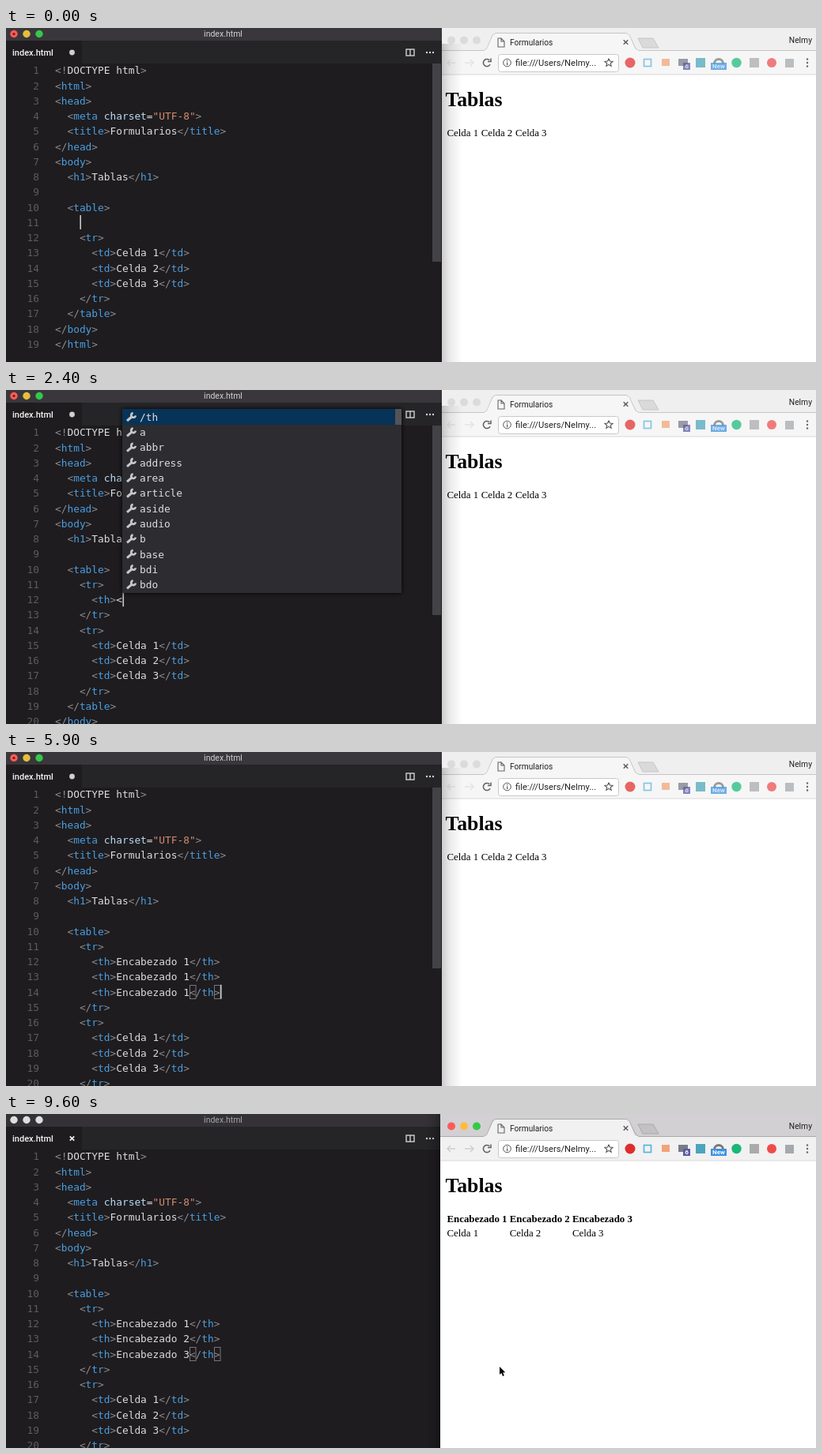
Write an HTML page with a canvas that moves like this. It is 1024 by 423 pixels and loops after 9700 ms.

```html
<!DOCTYPE html>
<html lang="es">
<head>
<meta charset="UTF-8">
<title>Tablas</title>
<style>
html, body { margin: 0; height: 100%; overflow: hidden; background: #fff; }
canvas { display: block; }
</style>
</head>
<body>
<canvas id="stage" width="1024" height="423"></canvas>
<script>
const g = document.getElementById('stage').getContext('2d');
const LOOP = 9700, SAVE = 7100, FOCUS = 8500, RELOAD = 8650;
const LEFT = 62, CW = 7.722, ROW = 19.25, FIRST = 11;
const MONO = '12.83px "DejaVu Sans Mono", monospace';
const UI = 'Roboto, sans-serif', SERIF = '"Liberation Serif", serif';
const WHITE = '#dcdcdc', BLUE = '#4a9ee0', GREY = '#8c8c90';
const USER = 'Nelmy';

const head = ['<!DOCTYPE html>', '<html>', '<head>', '  <meta charset="UTF-8">',
  '  <title>Formularios</title>', '</head>', '<body>', '  <h1>Tablas</h1>', '', '  <table>'];
const tail = ['    <tr>', ...[1, 2, 3].map(n => `      <td>Celda ${n}</td>`),
  '    </tr>', '  </table>', '</body>', '</html>'];
const tags = ('a abbr address area article aside audio b base bdi bdo blockquote table tbody td ' +
  'template textarea tfoot th thead time title tr track').split(' ');

// Typing script: "|" marks the caret, close is the tag the popup offers to end
const steps = [];
const step = (at, text, close) => steps.push({ at, text, close });
const inRow = s => `    <tr>\n      ${s}\n    </tr>`;
const cells = (...list) => inRow(list.map(s => `<th>Encabezado ${s}`).join('\n      '));

step(0, '    |');
step(150, '    <|', 'table');
step(300, '    <t|', 'table');
step(400, '    <tr|', 'table');
step(550, '    <tr>|');
step(700, '    <tr><|', 'tr');
step(900, '    <tr></tr>|');
step(1100, '    <tr>|</tr>');
step(1350, inRow('|'));
step(1700, inRow('<|'), 'tr');
step(1850, inRow('<t|'), 'tr');
step(2050, inRow('<th|'), 'tr');
step(2200, inRow('<th>|'));
step(2400, inRow('<th><|'), 'th');
step(2600, inRow('<th></th>|'));
for (let i = 4; i >= 0; i--)
  step(3050 - i * 60, inRow('<th>' + '</th>'.slice(0, i) + '|' + '</th>'.slice(i)));
for (let i = 1; i <= 12; i++)
  step(3250 + i * 100, inRow('<th>' + 'Encabezado 1'.slice(0, i) + '|</th>'));
step(4750, cells('1</th>|'));
step(5200, cells('1</th>', '1</th>|'));
step(5700, cells('1</th>', '1</th>', '1</th>|'));
step(6050, cells('1</th>', '1</th>|', '1</th>'));
step(6200, cells('1</th>', '1|</th>', '1</th>'));
step(6400, cells('1</th>', '|</th>', '1</th>'));
step(6500, cells('1</th>', '2|</th>', '1</th>'));
step(6650, cells('1</th>', '2</th>', '1|</th>'));
step(6750, cells('1</th>', '2</th>', '|</th>'));
step(6850, cells('1</th>', '2</th>', '3|</th>'));

const path = [[7250, 300, 300], [7700, 331, 271], [7900, 331, 271],
  [8450, 608, 46], [8800, 608, 46], [9350, 624, 320]];

const midY = line => 53.5 + (line - 1) * ROW;
const colX = col => LEFT + col * CW;

function box(x, y, w, h, color) {
  g.fillStyle = color;
  g.fillRect(x, y, w, h);
}
function dot(x, y, r, color) {
  g.fillStyle = color;
  g.beginPath();
  g.arc(x, y, r, 0, 7);
  g.fill();
}
function line(color, width, ...pts) {
  g.strokeStyle = color;
  g.lineWidth = width;
  g.beginPath();
  for (let i = 0; i < pts.length; i += 2) g.lineTo(pts[i], pts[i + 1]);
  g.stroke();
}
function frame(x, y, w, h, color, width = 1) {
  g.strokeStyle = color;
  g.lineWidth = width;
  g.strokeRect(x, y, w, h);
}
function text(s, x, y, font, color, align = 'left') {
  g.font = font;
  g.fillStyle = color;
  g.textAlign = align;
  g.fillText(s, x, y);
}
function cross(x, y, r, color, w) {
  line(color, w, x - r, y - r, x + r, y + r);
  line(color, w, x + r, y - r, x - r, y + r);
}
// Shadow of the front window, fading from x over w pixels
function shade(x, w, y, alpha) {
  const fade = g.createLinearGradient(x, 0, x + w, 0);
  fade.addColorStop(0, `rgba(0,0,0,${alpha})`);
  fade.addColorStop(.4, `rgba(0,0,0,${alpha * .4})`);
  fade.addColorStop(1, 'rgba(0,0,0,0)');
  box(Math.min(x, x + w), y, Math.abs(w), 423 - y, fade);
}

function codeLine(s, y, broken) {
  for (const m of s.matchAll(/<!?\/?|>|(?<=<\/?)\w+|"[^"]*"|\w+|./g)) {
    const tok = m[0], before = s[m.index - 1];
    let color = WHITE;
    if (/^[<>]/.test(tok)) color = tok === '<' && m.index === s.length - 1 ? WHITE : GREY;
    else if (/\w/.test(tok) && (before === '<' || before === '/')) color = BLUE;
    else if (tok[0] === '"') color = '#d08d70';
    else if (tok === 'charset') color = '#b9dcf0';
    if (broken && tok !== '>') color = '#d6e6f0';
    text(tok, colX(m.index), y + 4.8, MONO, color);
  }
}

function brackets(s, col, y) {
  let a = -1, b = -1;
  if (s[col] === '<') {
    a = col;
    b = s.indexOf('>', col);
  } else if (s[col - 1] === '>') {
    b = col - 1;
    a = s.lastIndexOf('<', b);
  }
  if (a < 0 || b < 0) return;
  for (const c of [a, b]) frame(Math.round(colX(c)) + .5, Math.round(y - 9) + .5, 7.5, 17, '#77757a');
}

function wrench(x, y) {
  line('#c8c8c8', 3, x - 5, y + 5, x + 2, y - 1);
  g.beginPath();
  g.lineWidth = 2.6;
  g.arc(x + 3, y - 2, 2.8, .1, 4.6);
  g.stroke();
}

function popup(s, col, close, row) {
  const m = s.slice(0, col).match(/<(\w*)$/);
  const doctype = /<th>E$/.test(s.slice(0, col));
  if (!m && !doctype) return;
  const word = doctype ? 'E' : m[1];
  const items = doctype ? ['DOCTYPE']
    : ['/' + close, ...tags.filter(t => t.startsWith(word))].slice(0, 12);
  const h = Math.round(items.length * 19.3 + 1), y = midY(row);
  const x = Math.round(colX(doctype ? col : m.index + (word ? 2 : 1)) - .2);
  const top = Math.round(row > FIRST && !doctype ? y - 8 - h : y + 10.5);
  g.save();
  g.shadowColor = '#000';
  g.shadowBlur = 6;
  box(x, top, 353, h, '#2d2c30');
  g.restore();
  box(x, top, 353, 20, '#073358');
  if (doctype) frame(x + .5, top + .5, 352, 19, '#14527f');
  items.forEach((item, i) => {
    const cy = top + 10 + i * 19.3, tx = x + 22;
    if (doctype) {
      frame(x + 5, cy - 5, 12, 10, '#a9a9a9');
      text('abc', x + 11, cy + 2.5, `7px ${UI}`, '#c8c8c8', 'center');
    } else wrench(x + 11, cy);
    text(item, tx, cy + 4.8, MONO, '#dedede');
    const at = doctype ? 6 : item.startsWith(word) ? 0 : -1;
    if (word && at >= 0) {
      const sx = tx + at * CW;
      box(sx, cy - 8, word.length * CW, 16, i || !doctype ? '#2d2c30' : '#073358');
      text(word, sx, cy + 4.8, `700 ${MONO}`, '#1b9df5');
    }
  });
  if (items.length > 4) box(x + 345, top, 8, word ? 155 : 20, '#545357');
}

function editor(t) {
  const active = t < FOCUS, saved = t >= SAVE;
  box(0, 0, 551, 423, '#1e1c1f');
  box(0, 0, 551, 16, active ? '#39373b' : '#343236');
  box(0, 16, 551, 29, '#252427');
  box(0, 16, 96, 29, '#1e1c1f');
  ['#fc5b57', '#e5bf3c', '#35c84a'].forEach((c, i) => dot(10 + i * 16, 7.5, 4.7, active ? c : '#dedede'));
  if (!saved) dot(10, 7.5, 1.6, '#7a1512');
  text('index.html', 274.5, 11, `10.5px ${UI}`, active ? '#d2d2d2' : '#a5a5a5', 'center');
  text('index.html', 8, 34.5, `500 11px ${UI}`, '#f4f4f4');
  if (saved) cross(83.5, 31, 2.7, '#f0f0f0', 1.7);
  else dot(83.5, 31, 3.4, '#cfcfcf');
  frame(506, 27, 10, 8, '#d0d0d0', 1.4);
  line('#d0d0d0', 1.4, 511, 27, 511, 35);
  for (let i = 0; i < 3; i++) dot(532 + i * 4, 31, 1.2, '#d0d0d0');

  const now = steps.findLast(s => s.at <= t);
  const parts = now.text.split('\n');
  const r = parts.findIndex(s => s.includes('|'));
  const col = parts[r].indexOf('|');
  parts[r] = parts[r].replace('|', '');
  const all = [...head, ...parts, ...tail], row = FIRST + r;
  if (active) box(539, 45, 11, 251 - 5.5 * (all.length - 19), '#434246');
  else shade(549, -18, 0, .3);
  all.slice(0, 20).forEach((s, i) => {
    const y = midY(i + 1);
    text(i + 1, 42, y + 4.8, MONO, '#5d5b5f', 'right');
    const prev = all[i - 1] || '';
    codeLine(s, y, i === row && /<\w+$/.test(prev));
  });
  brackets(parts[r], col, midY(row));
  if (active && (t - now.at) % 1000 < 500) box(colX(col) + .5, midY(row) - 9, 1.6, 18, '#c8c8c8');
  popup(parts[r], col, now.close, row);
}

function extensions(active) {
  g.globalAlpha = active ? 1 : .72;
  dot(789, 44, 6.5, '#e02c2c');
  frame(806.5, 39.5, 9, 9, '#58b5dc', 1.7);
  box(829, 39, 10, 9, '#f2a477');
  box(850, 39, 12, 9, '#777b86');
  box(856, 44, 9, 9, '#5b5aa5');
  text('6', 860.5, 51, `700 8px ${UI}`, '#fff', 'center');
  box(872, 38, 12, 12, '#4aa6bc');
  g.strokeStyle = '#777';
  g.lineWidth = 3;
  g.beginPath();
  g.arc(901, 45, 5.5, Math.PI, 0);
  g.stroke();
  box(891, 44, 20, 9, '#3b91e0');
  text('New', 901, 51.3, `700 8px ${UI}`, '#fff', 'center');
  dot(923.5, 44, 6.2, '#18b877');
  box(940, 38, 12, 12, '#aaa');
  dot(968, 44, 6, '#ee4b4b');
  box(985, 39, 11, 11, '#a5a9ad');
  g.globalAlpha = 1;
  for (let i = 0; i < 3; i++) dot(1013, 39.5 + i * 4.5, 1.2, '#666');
}

function star(x, y) {
  const pts = [];
  for (let i = 0; i <= 10; i++) {
    const a = i * Math.PI / 5 - Math.PI / 2, r = i % 2 ? 2.4 : 5.3;
    pts.push(x + r * Math.cos(a), y + r * Math.sin(a));
  }
  line('#555', 1.1, ...pts);
}

function browser(t) {
  const active = t >= FOCUS, x = active ? 549 : 551;
  const bar = active ? '#f2f1f2' : '#f6f6f6', edge = active ? '#aaa' : '#c6c6c6';
  box(x, 0, 1024 - x, 423, '#fff');
  box(x, 0, 1024 - x, 28, active ? '#d2d0d2' : '#f0eff0');
  box(x, 28, 1024 - x, 31, bar);
  line(edge, 1, x, 28.5, 604, 28.5, 608, 26, 615, 9, 619, 6.5, 784, 6.5, 788, 9, 796, 26, 800, 28.5, 1024, 28.5);
  g.fillStyle = bar;
  g.beginPath();
  for (const [px, py] of [[604, 29], [608, 26.5], [616, 9], [619, 7], [784, 7], [787.5, 9], [795, 26.5], [800, 29]])
    g.lineTo(px, py);
  g.fill();
  g.beginPath();
  for (const [px, py] of [[799, 13], [818, 13], [825, 25], [805, 25]]) g.lineTo(px, py);
  g.closePath();
  g.fillStyle = active ? '#c3c1c3' : '#dbdadb';
  g.fill();
  g.strokeStyle = edge;
  g.stroke();
  ['#fc5b57', '#fdbc40', '#34c84a'].forEach((c, i) => dot(563 + i * 16, 15.5, 5, active ? c : '#dcdbdc'));

  line('#666', 1.1, 626, 13, 622, 13, 622, 24, 630, 24, 630, 17, 626, 13, 626, 17, 630, 17);
  text('Formularios', 637, 21.5, `10.2px ${UI}`, '#222');
  cross(783.5, 18, 2.8, '#555', 1.3);
  text(USER, 1019, 19, `10.3px ${UI}`, '#222', 'right');

  const nav = active ? '#cdcdcd' : '#e2e2e2';
  line(nav, 1.4, 568, 44, 558, 44);
  line(nav, 1.4, 562, 40, 558, 44, 562, 48);
  line(nav, 1.4, 580, 44, 591, 44);
  line(nav, 1.4, 587, 40, 591, 44, 587, 48);
  g.strokeStyle = '#5f5f5f';
  g.lineWidth = 1.5;
  g.beginPath();
  g.arc(608, 44, 4.6, .5, 5.5);
  g.stroke();
  line('#5f5f5f', 1.5, 613, 38.5, 613, 42.5, 609, 42.5);

  g.beginPath();
  g.roundRect(622.5, 33.5, 152, 22, 3);
  g.fillStyle = '#fff';
  g.fill();
  g.strokeStyle = '#c9c9c9';
  g.lineWidth = 1;
  g.stroke();
  g.beginPath();
  g.arc(633.5, 44, 4.8, 0, 7);
  g.strokeStyle = '#555';
  g.stroke();
  box(633, 43.5, 1.2, 3.5, '#555');
  box(633, 41, 1.2, 1.3, '#555');
  text(`file:///Users/${USER}...`, 644, 48, `11.2px ${UI}`, '#222');
  star(762, 44);
  extensions(active);
  box(x, 58.5, 1024 - x, 1, '#dadada');

  text('Tablas', 555.5, 99, `700 25.7px ${SERIF}`, '#000');
  const fresh = t >= RELOAD;
  for (let i = 0; i < 3; i++) {
    const cx = 557.5 + i * (fresh ? 79.2 : 43.2);
    if (fresh) text(`Encabezado ${i + 1}`, cx, 136.7, `700 12.85px ${SERIF}`, '#000');
    text(`Celda ${i + 1}`, cx, fresh ? 154.5 : 136.7, `12.85px ${SERIF}`, '#000');
  }
  if (!active) shade(551, 26, 20, .2);
}

function pointer(t) {
  if (t < path[0][0]) return;
  const i = path.findLastIndex(p => p[0] <= t);
  const a = path[i], b = path[i + 1] || a;
  const u = b === a ? 0 : (t - a[0]) / (b[0] - a[0]), e = u * u * (3 - 2 * u);
  const x = a[1] + (b[1] - a[1]) * e, y = a[2] + (b[2] - a[2]) * e;
  if (x < 550) {
    line('#c9c9c9', 1.2, x, y - 5, x, y + 5);
    for (const d of [-1, 1]) line('#c9c9c9', 1.2, x - 3, y + d * 6.5, x, y + d * 5, x + 3, y + d * 6.5);
    return;
  }
  g.beginPath();
  for (const [dx, dy] of [[0, 0], [0, 10], [2.3, 8], [4, 12], [5.8, 11.2], [4.2, 7.4], [7.2, 7.2]])
    g.lineTo(x + dx, y + dy);
  g.closePath();
  g.strokeStyle = '#fff';
  g.lineWidth = 1.6;
  g.stroke();
  g.fillStyle = '#000';
  g.fill();
}

const start = performance.now();
function draw() {
  const t = (performance.now() - start) % LOOP;
  editor(t);
  browser(t);
  pointer(t);
  requestAnimationFrame(draw);
}
draw();
</script>
</body>
</html>
```
